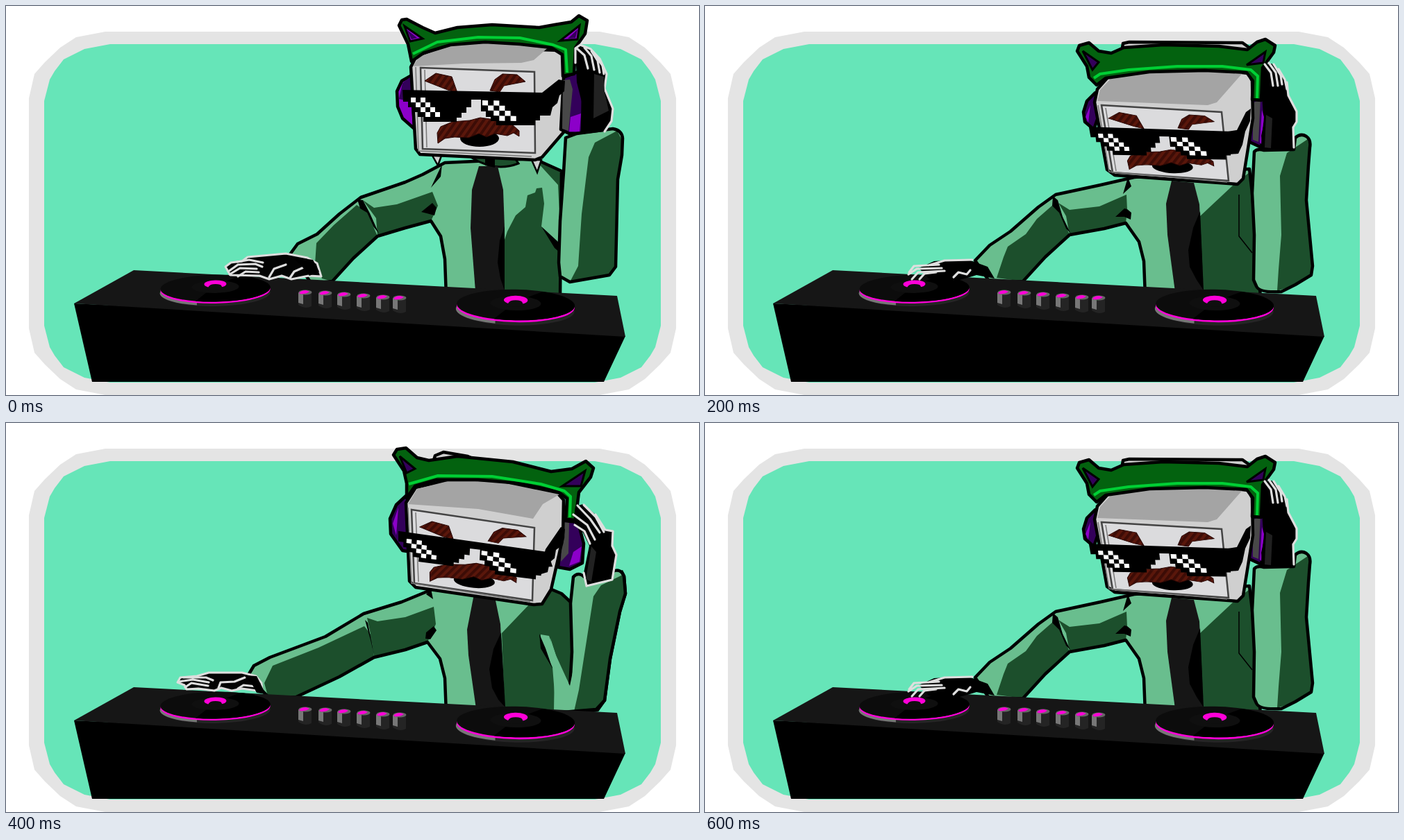
An HTML page for the animation above (0.8 s loop, 998 px wide and 561 px high).

```html
<!DOCTYPE html>
<html lang="en">
<head>
<meta charset="utf-8">
<title>DJ loop</title>
<style>
html, body { margin: 0; width: 100%; height: 100%; overflow: hidden; background: #fff; }
svg { display: block; width: 100vw; height: 100vh; }
.line { stroke: #000; stroke-width: 4.5; stroke-linejoin: round; }
.ink { fill: none; stroke: #000; stroke-width: 4.5; stroke-linejoin: round; }
.suit { fill: #69be8e; }
.shade { fill: #1c4f2c; }
.tie { fill: #161616; }
.box { fill: #cfcfcf; }
.top { fill: #a4a4a4; }
.panel { fill: #dbdbdd; stroke: #444; stroke-width: 2.5; }
.trim { fill: none; stroke: #777; stroke-width: 1.5; }
.band { fill: #03620f; }
.glow { fill: none; stroke: #00d035; stroke-width: 4; stroke-linejoin: round; }
.cup { fill: #33005a; }
.pad { fill: #484848; }
.violet { fill: #8c00c9; }
.grey { fill: #777; }
.bone { fill: none; stroke: #dedede; stroke-width: 3.2; stroke-linejoin: round; stroke-linecap: round; }
.glove { fill: #030303; stroke: #dedede; stroke-width: 3; stroke-linejoin: round; }
.pink { fill: #ff00d8; }
.a, .b, .c { animation: .8s step-end infinite; visibility: hidden; }
.a { animation-name: up; }
.b { animation-name: down; }
.c { animation-name: side; }
@keyframes up { 0% { visibility: visible } 25%, 100% { visibility: hidden } }
@keyframes down { 0%, 50% { visibility: hidden } 25%, 75%, 100% { visibility: visible } }
@keyframes side { 0%, 75%, 100% { visibility: hidden } 50% { visibility: visible } }
</style>
</head>
<body>
<svg viewBox="0 0 998 561" preserveAspectRatio="none">
<defs>
  <pattern id="hair" width="8" height="8" patternUnits="userSpaceOnUse" patternTransform="rotate(35)">
    <path fill="#5a170b" d="M0 0H8V8H0Z"/><path fill="#3c0c06" d="M0 0H4V8H0Z"/>
  </pattern>
  <g id="face">
    <ellipse cx="682" cy="191" rx="28" ry="12"/>
    <g fill="url(#hair)" stroke="#260603">
      <path d="M603 108L619 97 642 102 650 125 636 121Z"/>
      <path d="M697 122L704 106 715 98 736 99 748 109 717 115 711 124Z"/>
      <path d="M622 198L621 183 626 174 643 167 668 165 683 161 704 164 728 170 739 180 739 188 731 183 722 187 704 184 692 189 681 184 666 190 646 189 632 191Z"/>
    </g>
  </g>
  <path id="glare" fill="#fff" d="M0 0h7v7h-7ZM14 0h7v7h-7ZM7 7h7v7h-7ZM21 7h7v7h-7ZM14 14h7v7h-7ZM28 14h7v7h-7ZM21 21h7v7h-7ZM35 21h7v7h-7Z"/>
  <g id="shades">
    <path d="M571 121L776 125 784 148 777 149V158H769V165H762V172H706V166H698V160H691V152H684V135H670V146H663V154H656V161H649V167H601V160H593V153H586V146H579V138H572Z"/>
    <use href="#glare" transform="translate(583 132)"/>
    <use href="#glare" transform="matrix(1.16 .02 0 1.04 686 136)"/>
  </g>
  <g id="knob">
    <path fill="#242424" d="M0 3H19V23Q10 28 0 21Z"/>
    <path class="grey" d="M0 3L7 5V20L0 18Z"/>
    <ellipse cx="10" cy="3" rx="9.5" ry="3.4" fill="#666"/>
    <path class="pink" d="M1 4Q4 0 11 0L16 2Q12 5 4 5.5Z"/>
  </g>
  <g id="disc">
    <ellipse cy="7" rx="79" ry="19" fill="#252525"/>
    <path class="grey" d="M-79 3A79 19 0 0 0-27 24V18Z"/>
    <ellipse class="pink" cy="2.5" rx="79" ry="19.5"/>
    <ellipse rx="79" ry="19.5" fill="#0c0c0c"/>
    <path d="M0-4L36-17.3A79 19.5 0 0 1-29 18.2Z"/>
    <ellipse cy="-2" rx="34" ry="9" fill="#0f0f0f"/>
    <ellipse class="pink" cy="-6" rx="16" ry="5.6"/>
    <path d="M-10-2Q-8-6 0-6T9-3L11 2H-12Z" fill="#0f0f0f"/>
  </g>
  <path id="bodyA" d="M632 226L600 243 575 254 511 276 480 300 448 329 420 343 409 358 440 400 470 397 500 364 535 332 575 320 612 310 626 332 632 365 634 420 798 420 800 238 760 220Z"/>
  <path id="bodyB" d="M618 247L570 258 505 272 480 290 440 325 410 345 389 367 410 398 458 397 490 362 525 330 575 321 606 313 625 340 632 368 634 420 800 420 788 270 784 235Z"/>
  <path id="bodyC" d="M616 239L570 258 515 275 460 308 380 338 357 350 348 365 380 397 418 395 480 366 530 338 575 327 607 316 625 340 632 368 634 420 800 420 852 414 862 400 815 260 800 246 776 236Z"/>
  <path id="armA" d="M806 190L822 184 874 177Q887 179 888 191L887 215 881 250 878 376 869 388 812 398 798 390 796 370 798 310 803 240Z"/>
  <path id="armB" d="M791 210Q796 205 805 208L848 207 850 190Q858 183 866 188 873 193 871 204L869 230 866 280 875 375 873 388 850 402 830 412Q798 414 794 404L790 395 791 330 788 270Z"/>
  <path id="armC" d="M817 222Q824 214 833 222L874 214Q885 209 890 221L892 246 884 272 870 340 862 400 850 413 810 418 813 365 815 330 813 260Z"/>
  <path id="corner" d="M143 37L101 45 78 60 56 81 41 98 33 133V300H500V37Z"/>
  <path id="inset" d="M150 55L113 62 83 77 70 94 63 106 55 137V300H500V55Z"/>
  <g id="half">
    <use href="#corner" fill="#e4e4e4"/><use href="#corner" fill="#e4e4e4" transform="matrix(-1 0 0 1 998 0)"/>
    <use href="#inset" fill="#66e5b8"/><use href="#inset" fill="#66e5b8" transform="matrix(-1 0 0 1 998 0)"/>
  </g>
</defs>

<use href="#half"/>
<use href="#half" transform="matrix(1 0 0 -1 0 598)"/>

<g class="a">
  <use href="#bodyA" class="suit"/>
  <path class="shade" d="M505 287L520 297 535 332 500 364 470 397 455 393 445 372 447 342 472 316Z"/>
  <path class="shade" d="M514 280L530 291 563 286 614 268 622 288 612 310 575 320 535 332 533 306Z"/>
  <path class="shade" d="M772 262L775 285 771 318 797 353V414H717V340L722 325 734 302 748 290 751 273 762 269 764 263ZM764 224L800 238 800 320 797 300 795 258Z"/>
  <use href="#bodyA" class="ink"/>
  <path d="M628 228L612 262 626 246ZM598 297L614 284 620 291 617 302 606 299ZM506 279L514 280 524 299 537 328 529 318 520 298 510 292ZM771 318L790 349 797 355 795 340Z"/>
  <path class="shade" d="M671 219Q705 240 738 227L731 217Z" stroke="#000" stroke-width="3"/>
  <path class="tie" d="M681 231H708L716 265 718 320V411H676L669 320 671 265Z"/>
  <path d="M718 318L711 338 708 370 712 393 718 410ZM690 215H704V233L690 230Z"/>
  <path class="box" stroke="#000" stroke-width="2.5" d="M613 214L622 230 627 216ZM757 222L765 240 771 222Z"/>
  <path class="violet line" d="M584 100L570 108 563 123 564 145 571 162 588 177Z"/>
  <path class="cup" d="M584 101L571 111 566 134 585 139Z"/>
  <path class="box line" d="M583 88L590 74 630 58 798 64 804 77 803 182 772 218 762 222 596 214 590 206Z"/>
  <path class="top" d="M586 87L595 73 635 58 700 52 783 58 760 78 742 82 660 83Z"/>
  <path class="panel" d="M597 89L761 95 762 212 600 206Z"/>
  <path class="trim" d="M590 88L594 209 757 217M603 92L606 204"/>
  <path class="cup line" d="M803 103L823 95 831 120 830 185 811 184 799 178Z"/>
  <path class="pad" d="M802 107L812 106 816 120 810 180 801 177Z"/>
  <path class="violet" d="M813 160L828 155 826 181 811 181Z"/>
  <path class="band line" d="M584 80L579 55 566 28 570 20 577 19 600 31 618 39 650 31 700 27 768 31 790 27 814 23 825 14 837 21 834 40 820 60 818 98 802 101 801 70 785 60 740 55 690 52 640 56 601 68Z"/>
  <path class="glow" d="M586 69L621 52 680 45 740 46 788 56 806 63 808 96"/>
  <path class="violet" stroke="#000" stroke-width="3" d="M574 29L600 47 582 51ZM826 28L823 48 798 50Z"/>
  <path class="cup" d="M577 34L592 46 584 48ZM823 34L820 46 809 47Z"/>
  <use href="#face"/>
  <use href="#shades"/>
  <path d="M772 125L796 106 805 108 804 123 797 129 794 140 787 146 784 158 774 158Z"/>
  <use href="#armA" class="suit"/>
  <path class="shade" d="M839 218L848 197 880 180 888 195 887 215 881 250 878 376 869 388 812 398 824 375 829 300Z"/>
  <use href="#armA" class="ink"/>
  <path d="M820 61L827 56 842 62 855 76 865 98 862 119 874 148 872 166 862 181 827 185 832 150 822 110Z"/>
  <path class="bone" d="M820 82L820 61 827 56 842 62 855 76 865 98 862 119 874 148 872 166 862 181M823 62L833 71 838 90M833 60L843 72 847 92M843 65L852 79 855 96M851 74L859 86 861 98"/>
  <path fill="#222" d="M847 98L861 102 862 124 868 151 846 162Z"/>
</g>

<g class="b">
  <use href="#bodyB" class="suit"/>
  <path class="shade" d="M502 286L512 297 525 330 490 362 458 397 420 392 430 362 436 347 462 329 478 307Z"/>
  <path class="shade" d="M509 284L525 294 568 289 607 272 608 294 606 313 575 321 525 330 520 303Z"/>
  <path class="shade" d="M762 257L712 304 718 412 800 420 788 270 784 240Z"/>
  <use href="#bodyB" class="ink"/>
  <path d="M609 247L602 271 614 260ZM591 304L604 292 608 293 614 298 613 308 604 304ZM501 274L508 280 515 304 526 327 520 321 510 298 500 288Z"/>
  <path class="trim" style="stroke:#000" d="M769 272L769 332 788 356"/>
  <path class="tie" d="M672 252L704 255 712 286 718 412H677L666 330 664 285Z"/>
  <path d="M713 296L703 320 696 352 698 376 708 395 718 410Z"/>
  <path class="cup line" d="M562 125L550 137 545 153 547 167 560 178 571 146Z"/>
  <path class="violet" d="M548 160L555 143 552 168Z"/>
  <path class="cup line" d="M785 137L804 127 807 165 801 204 784 196Z"/>
  <path class="pad" d="M789 140L800 134 797 196 789 193Z"/>
  <path class="violet" d="M802 150L805 160 801 199 799 197Z"/>
  <path class="box line" d="M600 66L602 54 611 52 774 53 785 61 782 75Z"/>
  <path class="box line" d="M561 139L565 120 580 103 640 94 730 91 782 97 788 108 789 162 775 249 767 257 590 244 579 236Z"/>
  <path class="top" d="M565 137L569 121 584 105 640 95 710 93 774 97 737 139 724 143Z"/>
  <path class="panel" d="M571 143L744 153 754 252 587 240Z"/>
  <path class="trim" d="M566 143L582 239 752 254M577 147L592 238"/>
  <path class="band line" d="M564 114L553 103 550 87 536 65 539 57 553 53 567 65 585 68 603 60 660 56 740 58 781 63 795 52 807 48 821 57 819 67 803 89 801 136 788 135 789 108 780 96 720 93 640 95 577 104Z"/>
  <path class="glow" d="M560 104L569 98 610 92 680 87 745 87 786 92 796 101 795 133"/>
  <path class="cup" stroke="#000" stroke-width="3" d="M544 65L567 81 558 92ZM807 66L804 82 780 85Z"/>
  <use href="#face" transform="matrix(1.049 .028 .114 .811 -63.9 57.5)"/>
  <use href="#shades" transform="matrix(1.01 .015 .1 .87 -36 60.5)"/>
  <path d="M753 181L766 179 779 153 786 148 785 166 778 181 774 200 768 213 754 214Z"/>
  <use href="#armB" class="suit"/>
  <path class="shade" d="M828 245L838 212 868 192 871 204 869 230 866 280 875 375 873 388 850 402 824 411 826 380 830 330Z"/>
  <use href="#armB" class="ink"/>
  <path d="M805 84L816 83 828 94 838 112 840 129 852 152 852 167 847 175 848 206 803 209 801 187 807 160 801 110Z"/>
  <path class="bone" d="M838 110L840 129 852 152 852 167 847 175 848 204M806 84L815 96 818 115M812 82L822 96 825 115M819 84L829 100 831 113M826 91L835 106 838 120"/>
  <path fill="#202020" d="M808 157L817 162 815 205 806 204Z"/>
</g>

<g class="c">
  <use href="#bodyC" class="suit"/>
  <path class="shade" d="M516 293L526 306 530 338 480 366 418 395 378 397 372 375 384 350 450 324Z"/>
  <path class="shade" d="M520 281L535 286 575 280 616 265 619 290 607 316 575 327 530 338 526 309Z"/>
  <path class="shade" d="M756 259L714 303 718 412 792 414 787 352 770 320V305L782 307 792 335 812 379 824 340 815 260 800 246 776 236Z"/>
  <use href="#bodyC" class="ink"/>
  <path d="M612 239L605 247 615 254ZM605 302L616 293 620 299 611 312 604 311ZM517 284L521 288 530 334 525 313ZM768 304L770 325 787 354 777 325Z"/>
  <path class="tie" d="M674 247L705 256 712 290 718 412H677L666 335 664 298Z"/>
  <path d="M713 302L702 326 696 355 700 382 709 399 719 410Z"/>
  <path class="cup line" d="M576 105L562 118 553 138 554 160 571 184 584 186 582 120Z"/>
  <path class="violet" d="M557 145L565 122 562 162Z"/>
  <path class="box line" d="M615 57L618 47 630 42 665 48 700 64Z"/>
  <path class="cup line" d="M803 141L824 143 832 174 830 202 812 211 795 208Z"/>
  <path class="pad" d="M802 143L811 144 810 188 799 200Z"/>
  <path class="violet" d="M817 186L829 178 826 200 811 206Z"/>
  <path class="box line" d="M576 115L590 93 640 82 710 85 794 101 803 111 802 165 785 240 772 261 760 262 590 237 581 228Z"/>
  <path class="top" d="M579 117L592 95 640 83 710 85 797 103 773 117 759 138 680 124Z"/>
  <path class="panel" d="M584 125L761 151 758 256 588 231Z"/>
  <path class="trim" d="M579 122L584 231 755 258M590 129L594 229"/>
  <path class="band line" d="M577 108L577 87 573 69 558 46 563 38 576 36 592 50 609 54 650 48 730 56 785 70 815 66 835 55 846 65 842 78 825 100 820 140 806 139 808 109 795 99 740 87 680 82 620 82 589 91Z"/>
  <path class="glow" d="M580 88L622 76 700 77 770 88 804 98 813 106 812 136"/>
  <path class="cup" stroke="#000" stroke-width="3" d="M567 48L589 66 577 72ZM834 69L828 91 801 91Z"/>
  <use href="#face" transform="matrix(1.056 .09 -.06 .85 -34.4 3.9)"/>
  <use href="#shades" transform="matrix(1.05 .131 -.05 .88 -28.6 -25.6)"/>
  <path d="M777 182L799 150 805 153 802 176 792 183 790 195 783 201 780 215 767 219Z"/>
  <use href="#armC" class="suit"/>
  <use href="#armC" class="ink"/>
  <path class="suit" d="M784 310L795 345 812 379 822 330 848 250 822 415H789L790 355Z"/>
  <path class="shade" d="M846 250L857 234 888 219 892 246 884 272 870 340 862 400 850 413 818 416 825 385Z"/>
  <path class="ink" d="M886 213L890 221 892 246 884 272 870 340 862 400 850 413 790 418"/>
  <path d="M820 120L831 117 849 132 863 154 874 156 873 177 879 190 873 226 836 235 832 216 840 177 831 158 817 143Z"/>
  <path class="bone" d="M849 132L863 154 874 156 873 177 879 190 873 226 836 235 832 216M819 147L833 156 841 174M817 132L837 147 848 168M823 119L841 138 855 158M832 118L849 135 861 157"/>
  <path fill="#222" d="M843 178L850 186 843 229 835 225Z"/>
</g>

<path d="M98 429L500 449 892 476 861 542H124Z"/>
<path class="tie" d="M184 381L880 418 892 477 98 429Z"/>
<use href="#disc" transform="translate(301.5 407) rotate(-1)"/>
<use href="#disc" transform="translate(734 431) rotate(1) scale(1.075 1.14)"/>
<use href="#knob" x="421" y="410"/>
<use href="#knob" x="450" y="411"/>
<use href="#knob" x="477" y="413"/>
<use href="#knob" x="505" y="415"/>
<use href="#knob" x="533" y="417"/>
<use href="#knob" x="557" y="418"/>

<g class="a">
  <path class="glove" d="M316 376L324 370 340 368 348 362 403 357 434 363 448 371 454 390 436 389 411 394 397 389 379 394 365 389 323 388Z"/>
  <path class="bone" d="M320 383L334 373 359 372 369 376M322 387L337 378 361 379M334 390L345 383 364 384M333 369L350 366 370 370M379 391L386 379 403 373M409 392L415 383 433 375"/>
  <path d="M412 362L442 366 451 383 437 389 424 373Z"/>
</g>
<g class="b">
  <path d="M308 378L330 368 377 365 407 376 417 393 391 388 378 392 354 398 322 393Z"/>
  <path class="bone" d="M294 384L301 375 337 373M293 387L305 379 341 378M298 394L307 384 345 382M309 394L316 386 333 384M358 391L365 384 377 387 382 381M322 374L345 367 385 366"/>
</g>
<g class="c">
  <path class="glove" d="M247 374L251 367 275 365 292 360 340 360 360 365 368 375 369 387 340 383 325 386 310 382 300 386 277 383 260 384 257 378Z"/>
  <path class="bone" d="M249 373L269 370 292 374M258 381L267 375 291 379M256 367L288 367 298 371M306 382L309 374 329 373 344 367M334 383L342 378 360 380"/>
  <path d="M343 364L361 365 374 391 361 389 354 376Z"/>
</g>
</svg>
</body>
</html>
```
